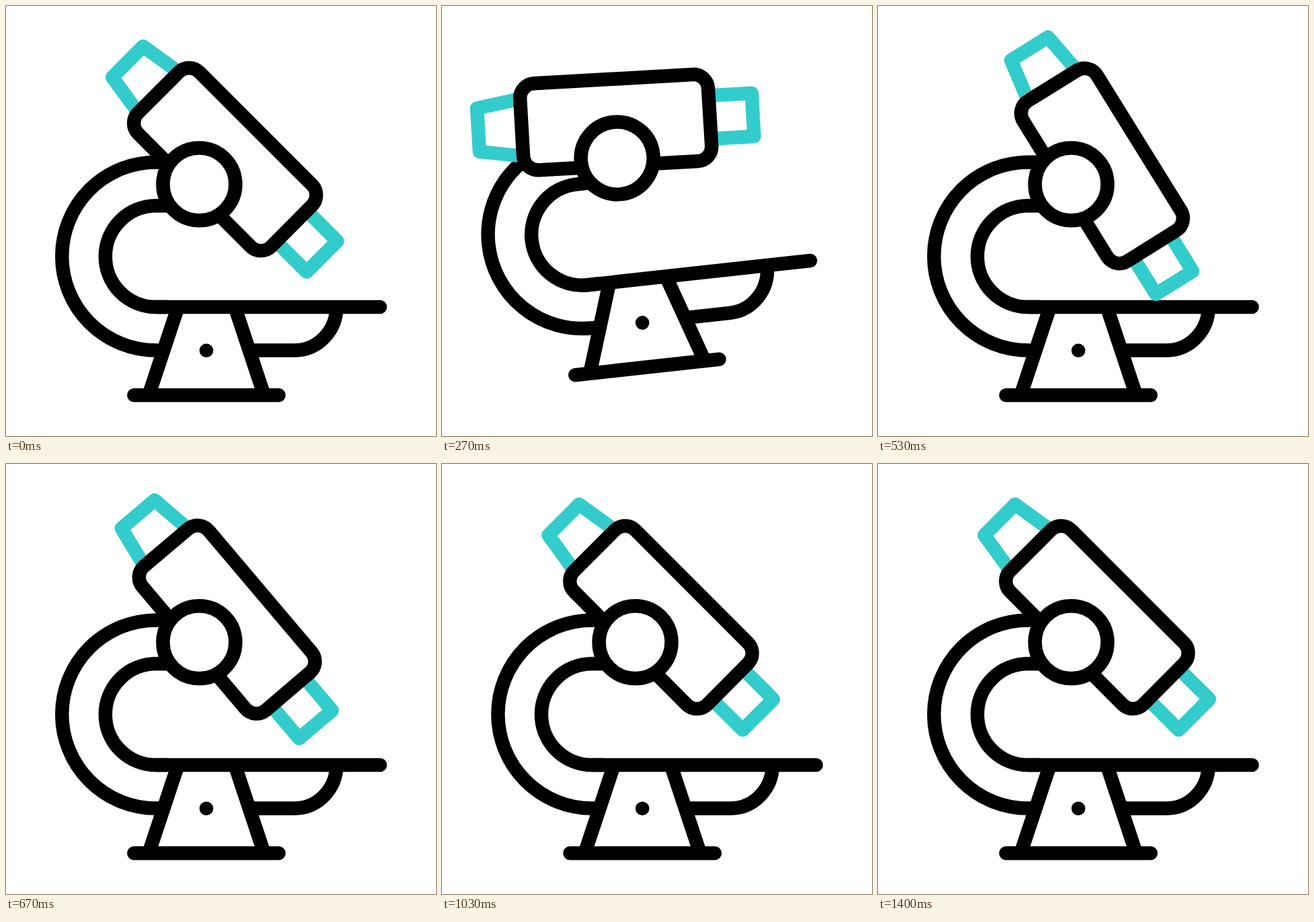
Animation of 640 by 640 pixels, one loop 1670 ms. Source, as an HTML page:

```html
<!DOCTYPE html>
<html lang="en">
<head>
<meta charset="utf-8">
<title>Microscope</title>
<style>
html, body { margin: 0; width: 100%; height: 100%; overflow: hidden; background: #fff; }
svg { display: block; width: 100vw; height: 100vh; }
.line { fill: none; stroke: #000; stroke-width: 20.5; }
.teal { stroke: #33cccc; stroke-linejoin: round; }
.solid { fill: #fff; }
.cap { stroke-linecap: round; }
</style>
</head>
<body>
<svg viewBox="0 0 640 640">
  <g id="machine">
    <path class="line" d="M245 232.5H223.3A140 140 0 0 0 223.3 512.5H234"/>
    <path class="line" d="M245 297.3H223.3A75.4 75.4 0 0 0 223.3 448.1H240"/>
    <path class="line" d="M362.5 512.5H429.5A62.4 64.4 0 0 0 491.9 448.1"/>
    <path class="line" d="M256 448.1L212.4 579.3M340.6 448.1L384.2 579.3"/>
    <path class="line cap" d="M224 448.1H556.8M190.4 579.3H406"/>
    <circle cx="298.2" cy="512.8" r="10.3"/>
    <g id="tube">
      <path class="line teal" d="M256.7 98.3L204 60L158.3 106L196.5 158.5"/>
      <path class="line teal" d="M447 304L493.1 350.1L447.5 395.7L401.5 349.7"/>
      <path id="body" class="line solid"/>
    </g>
    <circle class="line solid" cx="287.6" cy="265.2" r="54"/>
  </g>
</svg>
<script>
const LOOP = 1670;
const machine = document.getElementById("machine");
const tube = document.getElementById("tube");

// Rounded box standing at 45 degrees, given by its corner arc centres
const r = 21.75, k = r * Math.SQRT1_2;
const arc = (x, y) => `A${r} ${r} 0 0 1 ${x} ${y}`;
document.getElementById("body").setAttribute("d",
  `M${272.5 - k} ${114 - k}` + arc(272.5 + k, 114 - k) +
  `L${440 + k} ${281.5 - k}` + arc(440 + k, 281.5 + k) +
  `L${379.5 + k} ${342.5 + k}` + arc(379.5 - k, 342.5 + k) +
  `L${212 - k} ${174.5 + k}` + arc(212 - k, 174.5 - k) + "Z");

// Keys are [step, value], at 30 steps per second
const hop = [[0, 0], [7.35, 1], [14.35, 0]];
const swing = [[0, 0], [8, -42], [16, 13.2], [25, -7.1], [35, 3.9], [42, 0]];

function ease(keys, n) {
  for (let i = 1; i < keys.length; i++) {
    const [t0, v0] = keys[i - 1], [t1, v1] = keys[i];
    if (n < t1) {
      const p = (n - t0) / (t1 - t0);
      return v0 + (v1 - v0) * p * p * (3 - 2 * p);
    }
  }
  return keys[keys.length - 1][1];
}

function draw(ms) {
  const n = Math.floor((Math.floor(ms / 10) * 3 + 1) / 10);
  const h = ease(hop, n);
  machine.setAttribute("transform", `translate(0 ${-42.4 * h}) rotate(${-6.4 * h} 298.2 512.8)`);
  tube.setAttribute("transform", `rotate(${ease(swing, n)} 287.6 265.2)`);
}

const start = performance.now();
function tick(now) {
  draw(Math.max(0, now - start) % LOOP);
  requestAnimationFrame(tick);
}
draw(0);
requestAnimationFrame(tick);
</script>
</body>
</html>
```
